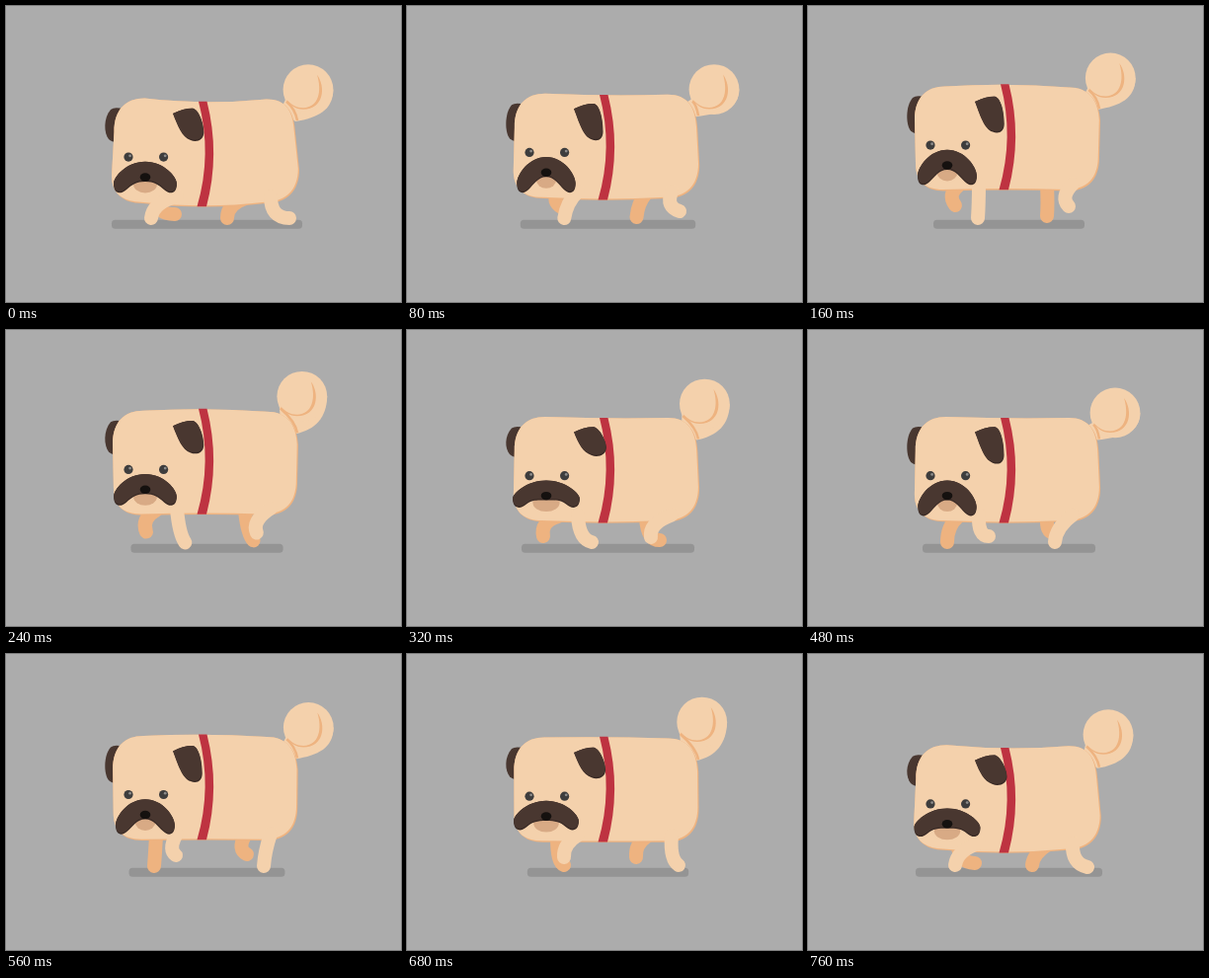
Write an HTML page with a canvas that moves like this. It is 400 by 300 pixels and loops after 800 ms.

```html
<!DOCTYPE html>
<html lang="en">
<head>
<meta charset="utf-8">
<title>Walking pug</title>
<style>
  html, body { margin: 0; width: 100%; height: 100%; overflow: hidden; background: #acacac; }
  canvas { display: block; width: 400px; height: 300px; }
</style>
</head>
<body>
<canvas id="stage" width="400" height="300"></canvas>
<script>
const ctx = document.getElementById('stage').getContext('2d');
const STEP = 40, STEPS = 20;
const FUR = '#f4d1ac', TAN = '#eeb380', DARK = '#493730', DEEP = '#392a25';

// Smooth periodic curve through (times, values).
function track(times, values, period) {
  const n = times.length;
  const at = i => {
    const k = ((i % n) + n) % n;
    return [times[k] + period * Math.floor(i / n), values[k]];
  };
  const slope = i => {
    const [t0, v0] = at(i - 1), [t1, v1] = at(i + 1);
    return (v1 - v0) / (t1 - t0);
  };
  return time => {
    const t = time % period;
    let i = n - 1;
    while (times[i] > t) i--;
    const [t0, v0] = at(i), [t1, v1] = at(i + 1);
    const d = t1 - t0, u = (t - t0) / d, w = 1 - u;
    return v0 * (1 + 2 * u) * w * w + v1 * u * u * (3 - 2 * u)
      + d * (slope(i) * u * w * w - slope(i + 1) * u * u * w);
  };
}

const bob = track([0, 1, 3, 4, 5, 6, 8, 10, 12, 14, 15, 17, 19],
  [0, 1.4, 10, 14, 15, 13.6, 6.3, 0.8, 6.3, 12.3, 13.4, 10.4, 1.4], 20);
const flap = track([0, 2, 4, 7, 8, 9], [0, 4.5, 4, -2, -4, -3.1], 10);
const wag = track([0, 2, 4, 6, 7, 8, 9], [0, 5, 0.3, -6.2, -7.3, -4.6, -2], 10);

const POSES = [0, 4, 8, 12, 14, 17, 19];
function leg(color, hip, kneeX, kneeY, footX, footY) {
  const [kx, ky, fx, fy] = [kneeX, kneeY, footX, footY].map(v => track(POSES, v, 20));
  return (t, hipY) => {
    ctx.strokeStyle = color;
    ctx.lineWidth = 14;
    ctx.lineCap = 'round';
    ctx.beginPath();
    ctx.moveTo(hip, hipY);
    ctx.quadraticCurveTo(kx(t), ky(t), fx(t), fy(t));
    ctx.stroke();
  };
}

const farLegs = [
  leg(TAN, 152, [152, 141, 135, 141, 151, 152, 152], [211, 191, 195, 199, 203, 212, 211],
    [171, 149, 138, 141, 150, 159, 169], [211, 202, 209, 215, 215, 214, 212]),
  leg(TAN, 242, [224, 243, 243, 241, 234, 231, 228], [201, 200, 213, 206, 198, 193, 203],
    [224, 242, 256, 249, 244, 232, 227], [215, 213, 213, 205, 203, 206, 214])
];
const nearLegs = [
  leg(FUR, 173, [149, 173, 174, 172, 164, 158, 151], [199, 200, 212, 209, 198, 193, 199],
    [147, 172, 187, 183, 172, 159, 149], [215, 215, 215, 209, 204, 206, 214]),
  leg(FUR, 268, [268, 255, 245, 251, 262, 266, 267], [215, 194, 196, 200, 200, 208, 213],
    [287, 264, 247, 250, 261, 275, 283], [215, 203, 210, 215, 215, 214, 216])
];

function fill(color, path) {
  ctx.fillStyle = color;
  ctx.fill(path);
}

// Fills a shape with a thin darker rim along its lower right edge.
function shaded(path, light, dark, dx, dy) {
  fill(dark, path);
  ctx.save();
  ctx.clip(path);
  ctx.translate(-dx, -dy);
  fill(light, path);
  ctx.restore();
}

function ellipse(color, x, y, rx, ry = rx) {
  const p = new Path2D();
  p.ellipse(x, y, rx, ry, 0, 0, Math.PI * 2);
  fill(color, p);
}

function shadow(b) {
  const half = 96.5 - 1.43 * b;
  const p = new Path2D();
  p.roundRect(203.5 - half, 216.7, half * 2, 9, 3.5);
  fill('#949494', p);
}

function tail(top, s) {
  const x = 306 + s, y = top - 8.8 + s * 0.92, base = top + 23.5;
  const stem = new Path2D();
  stem.moveTo(x + 25.4, y);
  stem.bezierCurveTo(x + 25, y + 21, 316 + s * 0.4, base - 4, 293, base);
  stem.lineTo(278, top + 12);
  stem.lineTo(x - 23, y + 10);
  stem.closePath();
  fill(FUR, stem);
  ellipse(FUR, x, y, 25.4);

  const curl = new Path2D();
  curl.moveTo(x + 9, y - 15);
  curl.bezierCurveTo(x + 18, y - 3, x + 16, y + 20, x - 5, y + 20);
  curl.bezierCurveTo(x - 13, y + 20, x - 19, y + 15, x - 22, y + 10);
  curl.bezierCurveTo(x - 17, y + 15, x - 12, y + 18.5, x - 5, y + 18.5);
  curl.bezierCurveTo(x + 11, y + 18, x + 14, y + 1, x + 9, y - 15);
  fill(TAN, curl);

  ctx.strokeStyle = TAN;
  ctx.lineWidth = 2.5;
  ctx.lineCap = 'butt';
  ctx.beginPath();
  ctx.moveTo(x - 22, y + 12);
  ctx.quadraticCurveTo(293, top + 11, 295, base - 1);
  ctx.stroke();
}

function bodyPath(top, topMid, low, lowMid, k) {
  const l0 = 109.5 - 1.5 * k, l1 = 107 + 2 * k, r0 = 293 + 3 * k, r1 = 297 - 2 * k;
  const p = new Path2D();
  p.moveTo(l0, top + 34);
  p.bezierCurveTo(l0, top + 11, l0 + 12, top, l0 + 31, top);
  p.quadraticCurveTo(203, 2 * topMid - top, 264, top + 1);
  p.bezierCurveTo(284, top + 1, r0 - 1, top + 14, r0, top + 35);
  p.lineTo(r1, low - 34);
  p.bezierCurveTo(r1, low - 12, 284, low, 263, low);
  p.quadraticCurveTo(203, 2 * lowMid - low, 138, low);
  p.bezierCurveTo(118, low, l1, low - 11, l1, low - 28);
  p.closePath();
  return p;
}

function collar(y0, y1) {
  const mid = (y0 + y1) / 2;
  const p = new Path2D();
  p.moveTo(195, y0);
  p.quadraticCurveTo(209, mid, 193.5, y1);
  p.lineTo(203, y1);
  p.quadraticCurveTo(217, mid, 203.5, y0);
  p.closePath();
  fill('#be3341', p);
}

function farEar(top, tip) {
  const p = new Path2D();
  p.moveTo(119, top + 11);
  p.quadraticCurveTo(110, top + 8.5, 106, top + 11.5);
  p.bezierCurveTo(98.5, top + 20, 99, tip - 8, 104, tip - 2);
  p.quadraticCurveTo(107, tip + 1, 112, tip + 1);
  p.closePath();
  fill(DARK, p);
}

function nearEar(top, tip, u) {
  const r = 200.3 - 0.4 * u;
  const p = new Path2D();
  p.moveTo(169, top + 15.5);
  p.quadraticCurveTo(180, top + 10, 189, top + 10.2);
  p.bezierCurveTo(195, top + 11, r, top + 25, r, tip - 9);
  p.bezierCurveTo(r, tip - 1, 193, tip + 1.5, 187, tip - 1);
  p.bezierCurveTo(178, tip - 4, 174, top + 28, 169, top + 15.5);
  shaded(p, DARK, DEEP, 0.5, 1.5);
}

function muzzle(top, u) {
  const cx = 141, h = 32 - u / 2;
  const y = top + 64.3, notch = top + 84.5, low = top + 95.7 + u;
  ellipse('#d8aa85', cx, top + 87, 12 - u * 0.4, 9);
  const p = new Path2D();
  p.moveTo(cx, y);
  p.bezierCurveTo(cx + 0.6 * h, y, cx + h, y + 0.5 * (low - y), cx + h, low - 9);
  p.bezierCurveTo(cx + h, low + 1, cx + 0.78 * h, low + 2.5, cx + 0.6 * h, low - 3);
  p.bezierCurveTo(cx + 0.42 * h, low - 8, cx + 0.28 * h, notch, cx, notch);
  p.bezierCurveTo(cx - 0.28 * h, notch, cx - 0.42 * h, low - 8, cx - 0.6 * h, low - 3);
  p.bezierCurveTo(cx - 0.78 * h, low + 2.5, cx - h, low + 1, cx - h, low - 9);
  p.bezierCurveTo(cx - h, y + 0.5 * (low - y), cx - 0.6 * h, y, cx, y);
  shaded(p, DARK, DEEP, 0, 1.4);
  ellipse('#15110f', cx, top + 80, 5.3, 4.2);
}

function eye(x, y) {
  ellipse('#3e3d3d', x, y, 4.6);
  ellipse('#8c8b8a', x + 1.6, y - 1.3, 1.4);
}

function draw(t) {
  const b = bob(t), u = flap(t);
  const top = 93.5 - 0.86 * b, topMid = 97 - 1.25 * b;
  const low = 200 - 0.9 * b, lowMid = 203.5 - 1.22 * b;
  const earTip = top + 43.5 + 0.9 * u;

  ctx.fillStyle = '#acacac';
  ctx.fillRect(0, 0, 400, 300);
  shadow(b);
  tail(top, wag(t));
  farEar(top, earTip);
  farLegs.forEach(drawLeg => drawLeg(t, low - 5));
  shaded(bodyPath(top, topMid, low, lowMid, b / 14), FUR, TAN, 1.2, 1.3);
  nearLegs.forEach(drawLeg => drawLeg(t, low - 7));
  collar(topMid - 0.2, lowMid - 0.2);
  nearEar(top, earTip, u);
  eye(124, top + 59.6);
  eye(159.6, top + 59.6);
  muzzle(top, u);
}

function frame() {
  draw(Math.floor(performance.now() / STEP) % STEPS);
  requestAnimationFrame(frame);
}
frame();
</script>
</body>
</html>
```
